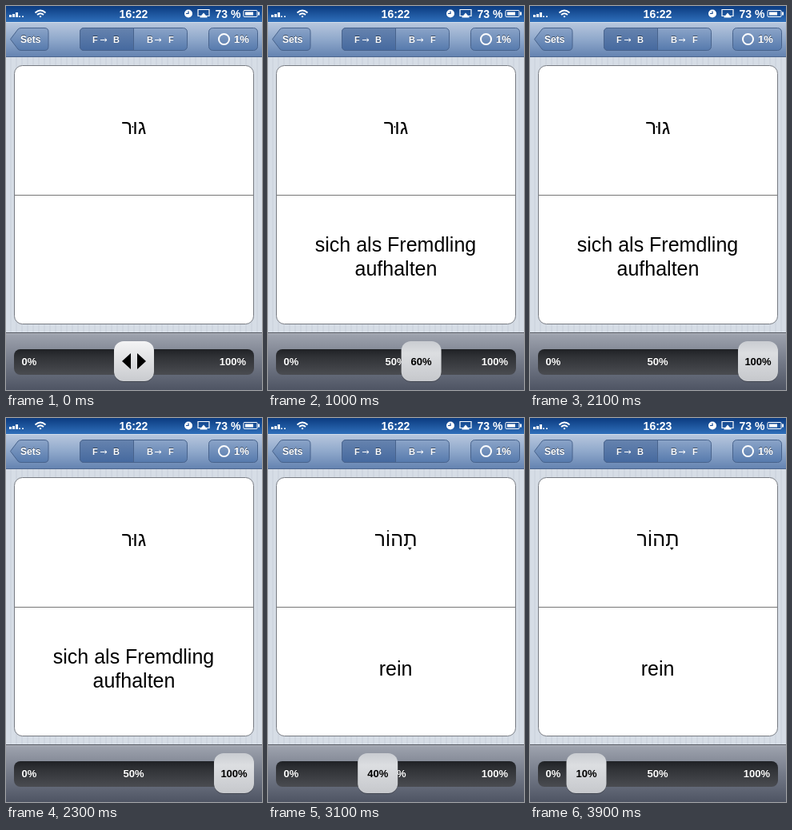
Write an HTML page that moves like this. It is 320 px wide and 480 px high and loops after 4 s.

```html
<!DOCTYPE html>
<html lang="de">
<head>
<meta charset="utf-8">
<title>Flashcards</title>
<style>
html, body { margin: 0; width: 100%; height: 100%; overflow: hidden; background: #d3dae3; }
svg { display: block; font-family: "Liberation Sans", Arial, sans-serif; }
.bold { font-weight: bold; font-size: 13px; fill: #fff; }
.bar { font-size: 14px; }
.button { fill: url(#button); stroke: #48638c; }
.button text, .shadow { text-shadow: 0 -1px #0007; }
.card { font-size: 25px; text-anchor: middle; }
.mid { text-anchor: middle; }
.arrow { fill: none; stroke: #fff; }
</style>
</head>
<body>
<svg width="320" height="480" viewBox="0 0 320 480">
  <defs>
    <linearGradient id="status" x2="0" y2="1"><stop stop-color="#0b3b80"/><stop offset="1" stop-color="#2f6fba"/></linearGradient>
    <linearGradient id="nav" x2="0" y2="1"><stop stop-color="#b9c8de"/><stop offset=".5" stop-color="#8fa8cb"/><stop offset="1" stop-color="#6382b0"/></linearGradient>
    <linearGradient id="button" x2="0" y2="1"><stop stop-color="#8ba4c8"/><stop offset="1" stop-color="#567aad"/></linearGradient>
    <linearGradient id="pressed" x2="0" y2="1"><stop stop-color="#6683ae"/><stop offset="1" stop-color="#45699f"/></linearGradient>
    <linearGradient id="tool" x2="0" y2="1"><stop stop-color="#a0a5b0"/><stop offset=".5" stop-color="#757b89"/><stop offset="1" stop-color="#4e5463"/></linearGradient>
    <linearGradient id="track" x2="0" y2="1"><stop stop-color="#1f2125"/><stop offset=".3" stop-color="#303236"/><stop offset="1" stop-color="#4a4c51"/></linearGradient>
    <linearGradient id="idle" x2="0" y2="1"><stop stop-color="#f4f4f5"/><stop offset="1" stop-color="#c9cbcf"/></linearGradient>
    <linearGradient id="held" x2="0" y2="1"><stop stop-color="#c9ccd1"/><stop offset=".3" stop-color="#dcdee1"/><stop offset="1" stop-color="#c6c8cc"/></linearGradient>
    <pattern id="stripes" width="7" height="7" patternUnits="userSpaceOnUse"><path fill="#d6dde6" d="M0 0h7v7H0z"/><path fill="#cfd6e0" d="M5 0h2v7H5z"/></pattern>
  </defs>

  <rect width="320" height="480" fill="url(#stripes)"/>

  <rect width="320" height="20" fill="url(#status)"/>
  <path fill="#fff" d="M4 11h3v3H4zM8 10h3v4H8zM12 8h3v6h-3zM16 12.500h2v1.500h-2zM20 12.500h2v1.500h-2z"/>
  <g fill="none" stroke="#fff" stroke-width="1.800">
    <path d="M36.500 8.500q6.500-6 13 0M39 11q4-3.600 8 0"/>
    <path d="M43 12l1.500 1-1.500 1.500-1.500-1.500z" fill="#fff" stroke="none"/>
    <path d="M244 12.500h-4v-8h14v8h-4" stroke-width="1.200"/>
    <path d="M247 8.500l5 6h-10z" fill="#fff" stroke="none"/>
    <circle cx="228" cy="9.500" r="5" fill="#fff" stroke="none"/>
    <path d="M228 6.500v3h-3" stroke="#174b94" stroke-width="1.200"/>
    <rect x="297" y="5.500" width="17" height="8" rx="1" stroke-width="1"/>
    <path d="M299 7.500h10v4h-10zM315 7.500h2v4h-2z" fill="#fff" stroke="none"/>
  </g>
  <text id="clock" class="bold bar mid" x="159.500" y="15"></text>
  <text class="bold bar" x="261.500" y="15">73 %</text>

  <rect y="20" width="320" height="44" fill="url(#nav)"/>
  <path d="M0 20.500h320" stroke="#d3deec"/>
  <path d="M0 63.500h320" stroke="#4c668e"/>
  <path class="button" d="M5.500 41.500L15 29q1.500-1.500 4-1.500h29q5 0 5 5v18q0 5-5 5H19q-2.500 0-4-1.500z"/>
  <rect class="button" x="92.500" y="27.500" width="134" height="28" rx="5"/>
  <path d="M159.500 27.500h-62q-5 0-5 5v18q0 5 5 5h62z" fill="url(#pressed)" stroke="#48638c"/>
  <rect class="button" x="253.500" y="27.500" width="61" height="28" rx="5"/>
  <circle cx="272.500" cy="41.500" r="6.500" fill="none" stroke="#fff" stroke-width="2"/>
  <g class="bold shadow">
    <text x="18" y="46" font-size="12">Sets</text>
    <text x="285" y="46">1%</text>
    <g style="font-size:11px">
      <text x="108" y="45.500">F</text><text x="134" y="45.500">B</text>
      <text x="176" y="45.500">B</text><text x="203" y="45.500">F</text>
    </g>
  </g>
  <path class="arrow" d="M118 42.500h8m-2.500-2l2.500 2-2.500 2M186 42.500h8m-2.500-2l2.500 2-2.500 2"/>

  <rect x="10.500" y="74.500" width="299" height="323" rx="10" fill="#fff" stroke="#777b82"/>
  <path d="M11 236.500h298" stroke="#777"/>
  <g class="card">
    <text id="front" x="160" y="160"></text>
    <text id="back1" x="159.500"></text>
    <text id="back2" x="160" y="337"></text>
  </g>

  <rect y="408" width="320" height="72" fill="url(#tool)"/>
  <path d="M0 408.500h320" stroke="#50545d"/>
  <path d="M0 409.500h320" stroke="#b0b4bd"/>
  <rect x="10" y="429" width="300" height="32" rx="8" fill="url(#track)"/>
  <g class="bold shadow">
    <text x="19.500" y="449">0%</text>
    <text class="mid" x="159.500" y="449">50%</text>
    <text x="300" y="449" text-anchor="end">100%</text>
  </g>
  <g id="thumb">
    <rect x="-25" y="420" width="50" height="50" rx="12" fill="#0004"/>
    <rect id="knob" x="-25" y="419" width="50" height="50" rx="12"/>
    <path id="arrows" d="M-15 444l11-10v20zM15 444l-11-10v20z"/>
    <text id="percent" class="bold mid" y="449" style="fill:#000"></text>
  </g>
</svg>
<script>
const $ = id => document.getElementById(id);
const LOOP = 4000, CENTER = 160, LEFT = 35, RANGE = 250;

const cards = [
  { start: 0, touch: 600, front: "גוּר", back: ["sich als Fremdling", "aufhalten"],
    drag: [[700, 160], [1000, 191.5], [1600, 254.5], [1900, 285]] },
  { start: 2500, touch: 2950, front: "תָהוֹר", back: ["rein", ""],
    drag: [[2950, 160], [3400, 92], [3900, 70.5]] }
];

function follow(points, t) {
  if (t <= points[0][0]) return points[0][1];
  for (let i = 1; i < points.length; i++) {
    const [t0, x0] = points[i - 1], [t1, x1] = points[i];
    if (t <= t1) return x0 + (x1 - x0) * (t - t0) / (t1 - t0);
  }
  return points.at(-1)[1];
}

function draw(t) {
  const card = cards[t < cards[1].start ? 0 : 1];
  const held = t >= card.touch;
  const x = held ? follow(card.drag, t) : CENTER;
  const [line1, line2] = held ? card.back : ["", ""];

  $("clock").textContent = t < 3600 ? "16:22" : "16:23";
  $("front").textContent = card.front;
  $("back1").textContent = line1;
  $("back2").textContent = line2;
  $("back1").setAttribute("y", line2 ? 307 : 322);
  $("thumb").setAttribute("transform", `translate(${x})`);
  $("knob").setAttribute("fill", `url(#${held ? "held" : "idle"})`);
  $("arrows").style.display = held ? "none" : "";
  $("percent").textContent = held ? Math.round((x - LEFT) / RANGE * 10) * 10 + "%" : "";
}

function tick() {
  draw(performance.now() % LOOP);
  requestAnimationFrame(tick);
}
tick();
</script>
</body>
</html>
```
